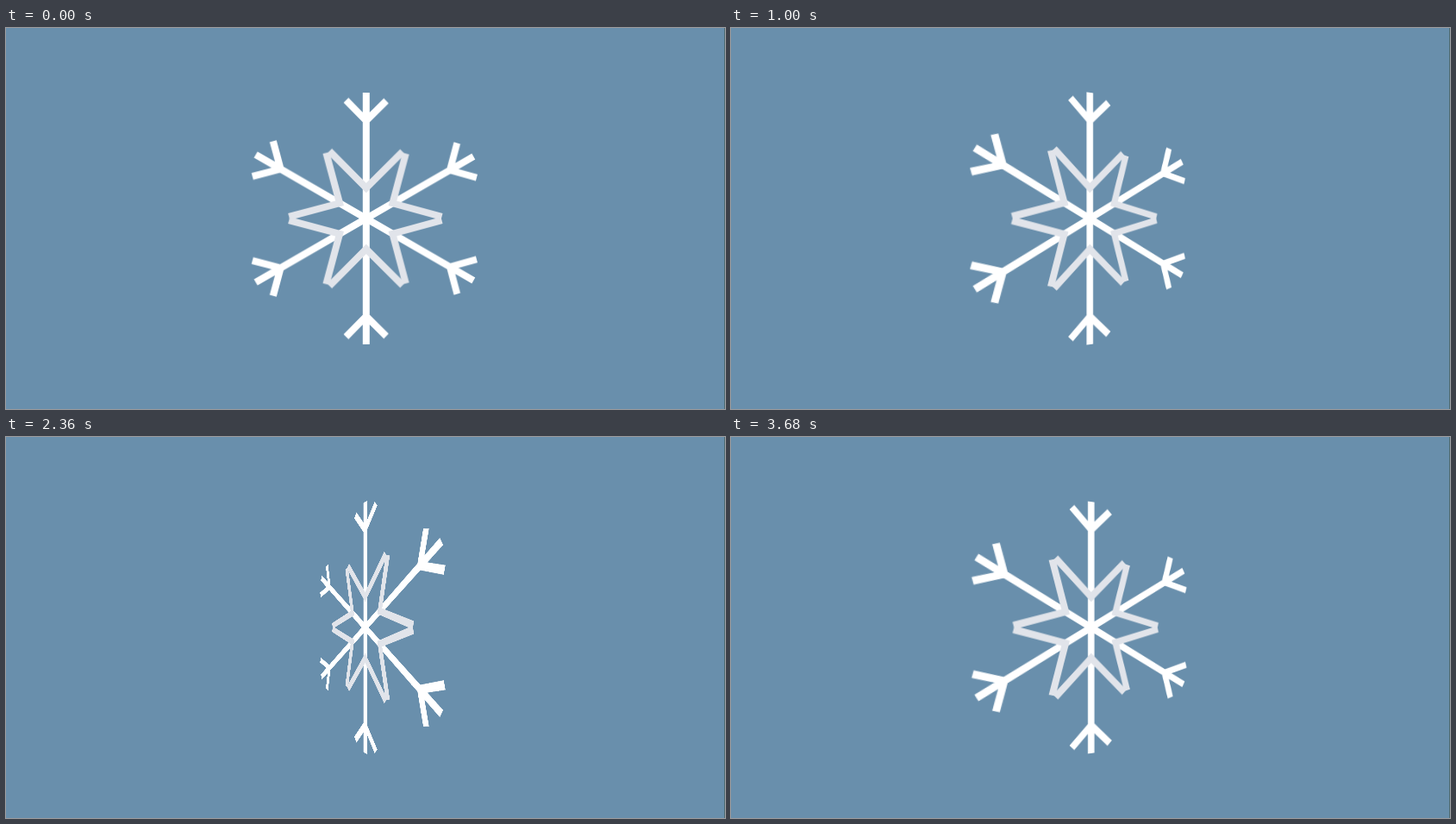
An HTML page that plays this animation: 834x442 px, repeating every 3720 ms.

```html
<!DOCTYPE html>
<html lang="en">
<head>
<meta charset="utf-8">
<title>Spinning snowflake</title>
<style>
  html, body { margin: 0; width: 100%; height: 100%; overflow: hidden; background: #698fac; }
  body { box-shadow: inset -1px 0 #4f6c72; }
  svg { position: absolute; left: 217px; top: 20.8px; width: 400px; height: 400px; fill: none; stroke-width: 8; }
</style>
</head>
<body>
<!-- The flake sits slightly right of its turning axis -->
<svg id="flake" viewBox="-200.8 -200 400 400">
  <g id="arms" stroke="#fff"></g>
  <g id="star" stroke="#e1e4ea"></g>
</svg>
<script>
const LOOP = 3720, STEP = 40;
// [time in ms, turn in degrees]: a nearly even spin that jumps back at the loop's end
const turns = [[0, 2.6], [480, 106.9], [1000, 200.3], [1800, 364.8],
               [2360, 480.8], [3240, 654.5], [3680, 740], [3720, 748]];
const flake = document.getElementById('flake');

// Two branches leaving a spoke at 45 degrees, at the given distance from the hub
const fork = (radius, length) => {
  const d = length * Math.SQRT1_2;
  return `M${-d} ${-radius - d}L0 ${-radius}L${d} ${-radius - d}`;
};

const repeat = (id, path) => {
  document.getElementById(id).innerHTML = Array.from({ length: 6 }, (_, i) =>
    `<path d="${path}" transform="rotate(${i * 60})"/>`).join('');
};
repeat('arms', 'M0 0V-146' + fork(113.5, 33));
repeat('star', fork(35.5, 60));

function angleAt(t) {
  const i = turns.findIndex(([time]) => time > t);
  const [t0, a0] = turns[i - 1], [t1, a1] = turns[i];
  return a0 + (a1 - a0) * (t - t0) / (t1 - t0);
}

function draw() {
  const t = Math.floor(performance.now() % LOOP / STEP) * STEP;
  flake.style.transform = `perspective(400px) rotateY(${angleAt(t)}deg)`;
  requestAnimationFrame(draw);
}
draw();
</script>
</body>
</html>
```
